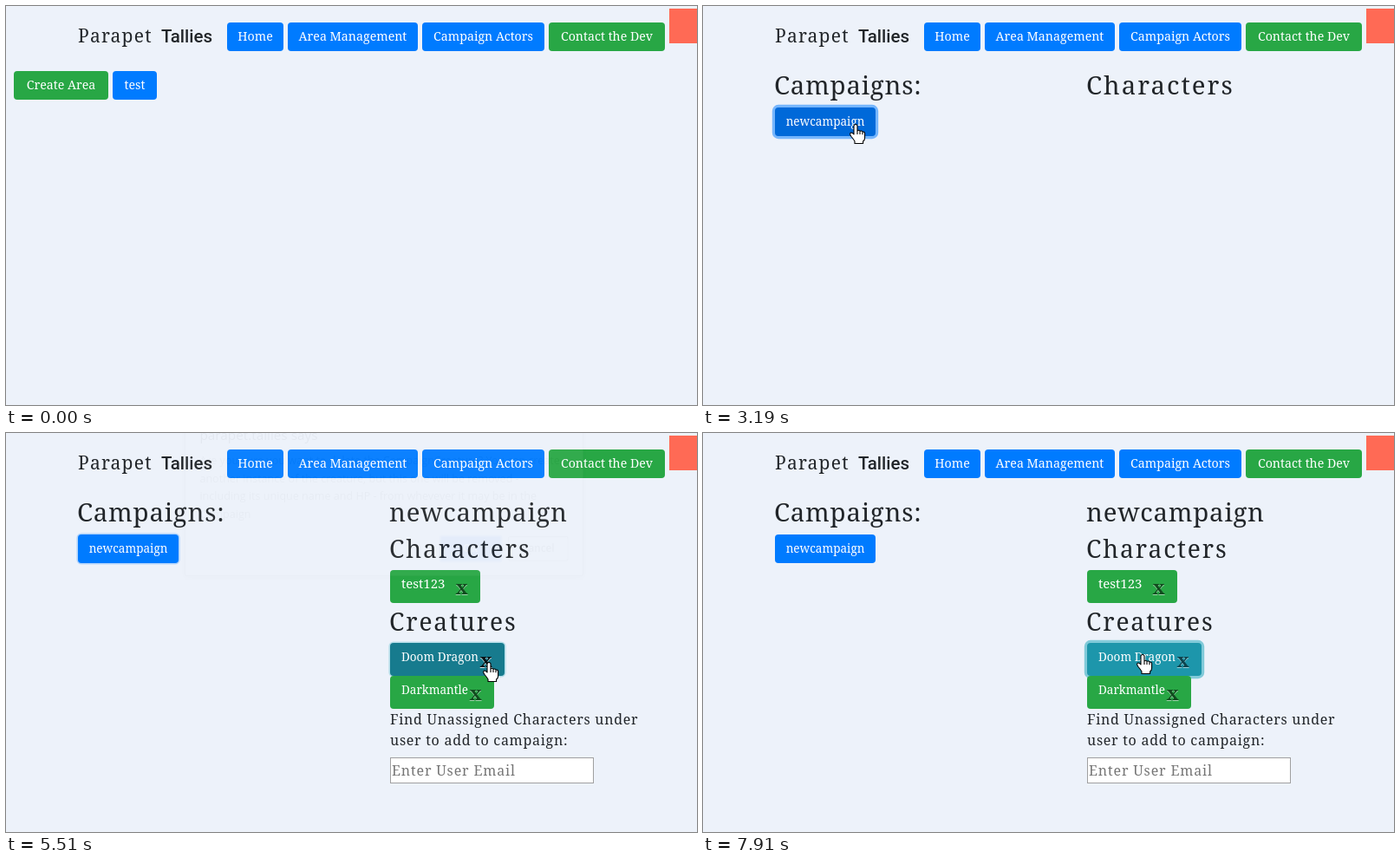
These frames come from a looping animation (797x460 px, 7.99 s). An HTML page:

```html
<!DOCTYPE html>
<html lang="en">
<head>
<meta charset="utf-8">
<title>Campaign manager</title>
<style>
html, body { margin: 0; width: 100%; height: 100%; overflow: hidden; background: #edf2fa; }
svg { display: block; width: 797px; height: 460px; }
text { font: 14.2px "Noto Serif", serif; fill: #212529; }
.btn rect { rx: 4px; fill: #007bff; stroke: #007bff; stroke-opacity: .5; stroke-width: 0; paint-order: stroke; }
.btn text { fill: #fff; text-anchor: middle; font-weight: 500; }
.btn .left { text-anchor: start; }
.btn .wide { font-size: 15px; }
.btn .small { font-size: 13.5px; }
.btn.green rect { fill: #28a745; }
.btn.teal rect { fill: #17a2b8; stroke: #17a2b8; }
.btn .x { font-size: 22px; font-weight: 700; fill: #000; opacity: .55; text-shadow: 0 1px 0 #fff; }
.brand { font-size: 21px; letter-spacing: 1.2px; }
.brand2 { font: 500 20.5px Roboto, sans-serif; }
.h2 { font-size: 29.4px; letter-spacing: .75px; }
.h2.wide { letter-spacing: 2px; }
.h3 { font-size: 28.2px; letter-spacing: 1.9px; }
.body { font-size: 16px; letter-spacing: .72px; }
.hint { font-size: 16px; letter-spacing: .85px; fill: #757575; }

#dialog { transform-box: fill-box; transform-origin: center; }
#dialog text { font: 12.3px "Open Sans", sans-serif; fill: #757575; }
#dialog .title { font-size: 15px; fill: #333; }
#dialog .label { font-size: 11.5px; font-weight: 600; text-anchor: middle; }
#dialog .ok { font-weight: 700; fill: #fff; }
#panel { fill: #fff; stroke: #a8abb0; filter: drop-shadow(0 2px 4px rgba(0, 0, 0, .35)); }
#cursor path { fill: #fff; stroke: #000; stroke-width: 1.1; stroke-linejoin: round; }

/* 1% is about 80 ms */
#areas, #campaigns, #empty, #detail, #dialog, #ripple, #show, #hand, #arrow { animation: 7.99s step-end infinite; }
#areas { animation-name: areas; }
#campaigns { opacity: 0; animation-name: campaigns; }
#empty { opacity: 0; animation-name: empty; }
#detail { opacity: 0; animation-name: detail; }
#dialog { opacity: 0; animation-name: dialog; }
#ripple { animation-name: ripple; }
#show { opacity: 0; animation-name: show; }
#hand { opacity: 0; animation-name: hand; }
#arrow { animation-name: arrow; }
#cursor { animation: move 7.99s linear infinite; }
#actors { animation: actorsFill 7.99s linear infinite, actorsRing 7.99s linear infinite; }
#camp { animation: campFill 7.99s linear infinite, campRing 7.99s linear infinite; }
#doom { animation: doomFill 7.99s linear infinite, doomRing 7.99s linear infinite; }
#doomX { animation: doomX 7.99s linear infinite; }

@keyframes areas { 0% { opacity: 1 } 23.15%, 100% { opacity: 0 } }
@keyframes campaigns { 0% { opacity: 0 } 23.15%, 100% { opacity: 1 } }
@keyframes empty { 0%, 40.9%, 100% { opacity: 0 } 23.15% { opacity: 1 } }
@keyframes detail { 0% { opacity: 0 } 40.9%, 100% { opacity: 1 } }
@keyframes dialog {
  0% { opacity: 0; transform: translateY(-16px) scale(1.022) }
  68.9% { opacity: .05; transform: translateY(-16px) scale(1.022) }
  69.9% { opacity: .4; transform: translateY(-8px) scale(1.012) }
  70.85% { opacity: .8; transform: translateY(-3px) scale(1.004) }
  71.8% { opacity: 1; transform: none }
  94.05% { opacity: .5; transform: translateY(-5px) }
  95.03%, 100% { opacity: 0; transform: none }
}
@keyframes ripple { 0% { r: 0 } 92.05% { r: 7px } 93.05% { r: 15.5px } 94.05%, 100% { r: 20px } }
@keyframes show { 0% { opacity: 0 } 4.72%, 100% { opacity: 1 } }
@keyframes hand {
  0%, 27.8%, 47.45%, 54.28%, 82.55% { opacity: 0 }
  11.48%, 31.88%, 51.35%, 56.2%, 98.97%, 100% { opacity: 1 }
}
@keyframes arrow {
  0%, 27.8%, 47.45%, 54.28%, 82.55% { opacity: 1 }
  11.48%, 31.88%, 51.35%, 56.2%, 98.97%, 100% { opacity: 0 }
}
@keyframes move {
  0%, 4.72% { transform: translate(708px, 483px); animation-timing-function: steps(4, start) }
  8.58% { transform: translate(553px, 120px); animation-timing-function: steps(4, start) }
  12.44% { transform: translate(520px, 44px) }
  27.8% { transform: translate(520px, 44px); animation-timing-function: steps(5, start) }
  32.9% { transform: translate(200px, 146px); animation-timing-function: steps(3, start) }
  35.95% { transform: translate(176px, 136px) }
  47.45% { transform: translate(176px, 136px); animation-timing-function: steps(5, start) }
  52.33% { transform: translate(525px, 247px); animation-timing-function: steps(3, start) }
  55.26% { transform: translate(592px, 273px); animation-timing-function: steps(3, start) }
  58.2% { transform: translate(557px, 264px) }
  82.55% { transform: translate(557px, 264px); animation-timing-function: steps(4, start) }
  86.37% { transform: translate(538px, 200px); animation-timing-function: steps(5, start) }
  91.15% { transform: translate(606px, 143px) }
  94.05% { transform: translate(606px, 143px); animation-timing-function: steps(6, start) }
  99.95%, 100% { transform: translate(507px, 255px) }
}
@keyframes actorsFill {
  0%, 11.48% { fill: #007bff }
  12.4%, 17.4% { fill: #0069d9 }
  18.4% { fill: #0062cc }
  19.4%, 27.8% { fill: #0069d9 }
  29.7%, 100% { fill: #007bff }
}
@keyframes actorsRing {
  0%, 17.4% { stroke-width: 0 }
  19.3%, 23.14% { stroke-width: 6.4px }
  23.15%, 100% { stroke-width: 0 }
}
@keyframes campFill {
  0%, 32% { fill: #007bff }
  34%, 47.45% { fill: #0069d9 }
  49.3%, 100% { fill: #007bff }
}
@keyframes campRing {
  0%, 37.8% { stroke-width: 0; stroke-opacity: 0 }
  39.8%, 66.8% { stroke-width: 6.4px; stroke-opacity: .5 }
  68.9%, 94.05% { stroke-width: 3.2px; stroke-opacity: .25 }
  96%, 100% { stroke-width: 0; stroke-opacity: 0 }
}
@keyframes doomFill {
  0%, 51.35% { fill: #17a2b8 }
  53.3%, 54.28% { fill: #138496 }
  56.2% { fill: #17a2b8 }
  58.2%, 66.8% { fill: #138496 }
  67.8%, 94.05% { fill: #177b8e }
  96%, 98.96% { fill: #17a2b8 }
  98.97%, 100% { fill: #1d96ab }
}
@keyframes doomRing {
  0%, 66.8% { stroke-width: 0; stroke-opacity: 0 }
  68.9%, 94.05% { stroke-width: 3.2px; stroke-opacity: .25 }
  96%, 100% { stroke-width: 6.4px; stroke-opacity: .5 }
}
@keyframes doomX { 0%, 58% { opacity: .55 } 59.2%, 94.05% { opacity: .85 } 96%, 100% { opacity: .55 } }
</style>
</head>
<body>
<svg viewBox="0 0 797 460">
  <rect width="797" height="460" fill="#edf2fa"/>

  <text class="brand" x="83" y="42">Parapet</text>
  <text class="brand2" x="179" y="42">Tallies</text>
  <g class="btn"><rect x="255" y="19" width="65" height="33"/><text x="287.5" y="40">Home</text></g>
  <g class="btn"><rect x="325" y="19" width="150" height="33"/><text x="400" y="40">Area Management</text></g>
  <g class="btn"><rect id="actors" x="480" y="19" width="141" height="33"/><text x="550.5" y="40">Campaign Actors</text></g>
  <g class="btn green"><rect x="626" y="19" width="134" height="33"/><text x="693" y="40">Contact the Dev</text></g>
  <rect x="765" y="3" width="40" height="40" fill="#ff6a55"/>

  <g id="areas">
    <g class="btn green"><rect x="9" y="75" width="109" height="33"/><text x="63.5" y="96">Create Area</text></g>
    <g class="btn"><rect x="123" y="75" width="51" height="33"/><text x="148.5" y="96">test</text></g>
  </g>

  <g id="campaigns">
    <text class="h2" x="82" y="102">Campaigns:</text>
    <g class="btn"><rect id="camp" x="83" y="117" width="116" height="33"/><text class="small" x="141" y="138">newcampaign</text></g>
  </g>
  <text id="empty" class="h2 wide" x="442" y="102">Characters</text>

  <g id="detail">
    <text class="h2" x="442" y="102">newcampaign</text>
    <text class="h3" x="442" y="144">Characters</text>
    <g class="btn green">
      <rect x="443" y="158" width="104" height="38"/>
      <text class="left wide" x="456" y="179">test123</text><text class="x" x="525.5" y="186">x</text>
    </g>
    <text class="h3" x="442" y="228">Creatures</text>
    <g class="btn teal">
      <rect id="doom" x="443" y="242" width="132" height="38"/>
      <text class="left small" x="456" y="263">Doom Dragon</text><text id="doomX" class="x" x="553.5" y="270">x</text>
    </g>
    <g class="btn green">
      <rect x="443" y="280" width="120" height="38"/>
      <text class="left small" x="456" y="301">Darkmantle</text><text class="x" x="541.5" y="308">x</text>
    </g>
    <text class="body" x="443" y="336">Find Unassigned Characters under</text>
    <text class="body" x="443" y="360">user to add to campaign:</text>
    <rect x="443.5" y="374.5" width="234" height="29" fill="#fff" stroke="#a0a0a0"/>
    <text class="hint" x="445" y="395">Enter User Email</text>
  </g>

  <g id="dialog">
    <rect id="panel" x="211.5" y="-6" width="449" height="184.5" rx="2"/>
    <text class="title" x="228" y="25">parapet.tallies says</text>
    <text x="228" y="53">Are you sure you want to delete the CampaignCreature? You can create</text>
    <text x="228" y="73">another instance of the creature, but this one will be removed -</text>
    <text x="228" y="93">including its unique name and HP - from whevever it may be in the</text>
    <text x="228" y="113">Campaign</text>
    <rect x="499.5" y="133.5" width="69" height="29" rx="2" fill="#4683f7" stroke="#a5c4fb" stroke-width="2"/>
    <text class="label ok" x="533.5" y="152">OK</text>
    <rect x="576.5" y="134.5" width="67" height="27" rx="2" fill="#fff" stroke="#aaa"/>
    <clipPath id="clip"><rect x="577" y="135" width="66" height="26"/></clipPath>
    <g clip-path="url(#clip)"><circle id="ripple" cx="606" cy="146" r="0" fill="#000" fill-opacity=".1"/></g>
    <text class="label" x="610" y="152">Cancel</text>
  </g>

  <g id="show"><g id="cursor">
    <path id="arrow" d="M0 0V16L3.8 12.4L6.3 18L8.8 17L6.4 11.5H11.5Z"/>
    <path id="hand" d="M-2 1.8Q0 -1 2 1.8V8q2.2-1.5 3 .3q2.2-1 3 .8q2.4-.6 2.6 2V16q0 3-2 4V22.5H-1V20q-1-2-4-5.5q-2.2-3-.8-4.2q1.5-1 3.8 1.7ZM2 8v4M5 8.5v3.5M8 9.2v3"/>
  </g></g>
</svg>
</body>
</html>
```
